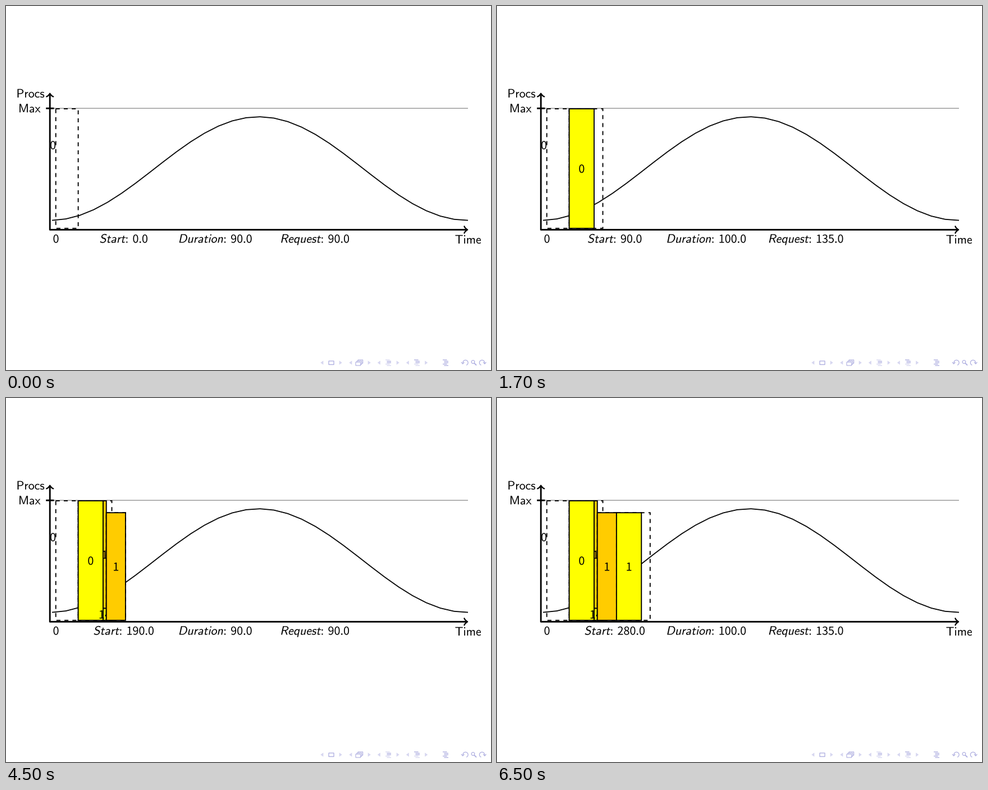
These frames come from a looping animation (864 by 648 pixels, 8 s). A matplotlib script:

```python
import numpy as np
import matplotlib.pyplot as plt
from matplotlib.animation import FuncAnimation
from matplotlib.mathtext import MathTextParser
from matplotlib.patches import PathPatch, Polygon, Rectangle
from matplotlib.path import Path
from matplotlib.textpath import TextPath
from matplotlib.transforms import Affine2D

plt.rcParams["mathtext.fontset"] = "cm"

WIDTH, HEIGHT, DPI = 864, 648, 72   # at 72 dpi one point is one pixel
INTERVAL, FRAMES = 500, 16
STEP_STARTS = [1, 5, 9, 13]
SIZE, DIGIT_SIZE = 21.8, 19.8
THICK, HEAVY = 1.9, 2.85
YELLOW, ORANGE = "#ffff00", "#ffcc00"
PALE, MID = "#d6d6f0", "#adade0"
LEFT, FLOOR, RIGHT = 78.2, 398.3, 823
BASE, BASELINE = 395.8, 421.5
FULL, HIGH, LOW = 183, 204.2, 374.3   # tops of the bars

fig = plt.figure(figsize=(WIDTH / DPI, HEIGHT / DPI), dpi=DPI, facecolor="white")
ax = fig.add_axes([0, 0, 1, 1])
ax.set(xlim=(0, WIDTH), ylim=(HEIGHT, 0))
ax.axis("off")
parser = MathTextParser("path")


def at(time):
    return 88.7 + 0.4436 * time


def is_number(s):
    return s[0].isdigit()


def sans(s):
    return rf"$\mathsf{{{s}}}$"


def text_width(s):
    if is_number(s):
        return DIGIT_SIZE * sum(0.278 if c == "." else 0.555 for c in s)
    return parser.parse(sans(s), dpi=720).width * SIZE / 100


def put(artist, z):
    artist.set(zorder=z, snap=False)
    return ax.add_artist(artist)


def line(xs, ys, color="black", lw=THICK, z=2):
    ax.plot(xs, ys, color=color, lw=lw, zorder=z, snap=False,
            solid_capstyle="butt", solid_joinstyle="round")


def text(s, x, y, z=5, slant=0.0):
    """Draw s with its left end on the baseline point (x, y)."""
    if is_number(s):
        path = TextPath((0, 0), s, size=DIGIT_SIZE, prop={"family": "Noto Sans CJK JP"})
    else:
        path = TextPath((0, 0), sans(s), size=SIZE)
    place = Affine2D.from_values(1, 0, slant, -1, x, y)
    return put(PathPatch(path.transformed(place), fc="black", lw=0), z)


def centered(s, x, y, z=5):
    return text(s, x - text_width(s) / 2, y, z)


def caption(word, value, x):
    """Slanted word, colon and value, centred on x."""
    word_w, gap = text_width(word), 0.611 * SIZE
    x -= (word_w + gap + text_width(value)) / 2
    colon_x = x + word_w + 0.1 * SIZE
    dots = [put(Rectangle((colon_x, y), 2.1, 2.2, fc="black", lw=0), 5)
            for y in (BASELINE - 9.6, BASELINE - 2.2)]
    return [text(word, x, BASELINE, slant=0.2126),
            text(value, x + word_w + gap, BASELINE), *dots]


def captions(start, duration, request):
    return (caption("Start", start, 209.6) + caption("Duration", duration, 372.6)
            + caption("Request", request, 550))


def dashed(start, end, top, z):
    dash = 7.11 / THICK
    box = Rectangle((at(start), top), at(end) - at(start), BASE - top, fill=False,
                    ec="black", lw=THICK, ls=(0, (dash, dash)), capstyle="butt")
    return put(box, z)


def bar(start, end, top, bottom, color, label, z):
    x0, x1 = at(start), at(end)
    box = Rectangle((x0, top), x1 - x0, bottom - top, fc=color, ec="black",
                    lw=THICK, joinstyle="miter")
    return [put(box, z),
            centered(label, (x0 + x1) / 2, (top + bottom) / 2 + 7.5, z + 0.1)]


def arrow_tip(x, y, angle):
    points = 1.52 * np.array([(-3, 4), (-2.75, 2.5), (0, 0.25), (0.75, 0),
                              (0, -0.25), (-2.75, -2.5), (-3, -4)])
    path = Path(points, [Path.MOVETO] + [Path.CURVE4] * 6)
    place = Affine2D().rotate_deg(angle).translate(x, y)
    put(PathPatch(path.transformed(place), fill=False, lw=0.8 * HEAVY,
                  capstyle="round", joinstyle="round"), 3)


def draw_chart():
    line([LEFT, RIGHT], [182.1, 182.1], "#606060", 0.95, 1)
    xs = np.linspace(82, RIGHT, 31)
    line(xs, 289.4 + 92.2 * np.cos(np.pi * (xs - 79) / 371.5), lw=1.8)
    line([LEFT, LEFT, RIGHT - 2], [156.5, FLOOR, FLOOR], lw=HEAVY, z=3)
    line([71.2, 85.4], [182.2, 182.2], lw=HEAVY, z=3)
    arrow_tip(RIGHT - 2, FLOOR, 0)
    arrow_tip(LEFT, 156.8, -90)
    centered("Procs", 43.6, 163)
    centered("Max", 41.8, 189.5)
    centered("Time", 823.2, 423)
    centered("0", 89, BASELINE)
    centered("0", 83.6, 255)


def draw_navigation():
    y = 635
    for x, way in zip((563, 596, 614, 647, 664.5, 698, 715.5, 748.5), (-1, 1) * 4):
        put(Polygon([(x + 2.7 * way, y), (x - 2.3 * way, y - 3.6),
                     (x - 2.3 * way, y + 3.6)], fc=PALE, lw=0), 2)
    put(Rectangle((575, 632), 9, 6.4, fill=False, ec=MID, lw=1.3), 2)
    for k in range(3):
        put(Rectangle((627 - 2 * k, 630 + 2 * k), 8.6, 6, fc="white", ec=MID, lw=1.1), 2)
    for x, dark in ((681, (1, 2)), (732, (0, 1, 2)), (783, range(5))):
        for k, indent in enumerate((0, 2.4, 2.4, 0, 2.4)):
            left = x - 5 + indent
            line([left, left + 7.6], [630 + 2.5 * k] * 2,
                 MID if k in dark else PALE, 1.3)
    turn = np.radians(np.linspace(-190, 70, 40))
    for x, way in ((818.5, -1), (848, 1)):
        line(x - way * 4.6 * np.cos(turn) * -1, y + 4.6 * np.sin(turn), MID, 1.2) \
            if way == 0 else line(x + way * 4.6 * -np.cos(turn),
                                  y + 4.6 * np.sin(turn), MID, 1.2)
        head = x + way * 4.8
        line([head - 2.6, head, head + 2.6], [634, 637.2, 634], MID, 1.2)
    ring = np.linspace(0, 2 * np.pi, 40)
    line(832 + 2.8 * np.cos(ring), 633.6 + 2.8 * np.sin(ring), MID, 1.2)
    line([834.2, 838], [635.8, 639.6], MID, 1.8)


draw_chart()
draw_navigation()

# Bars accumulate from step to step; captions belong to one step only.
bars = [
    [dashed(0, 90, FULL, 4)],
    [dashed(90, 225, FULL, 4.1), *bar(90, 190, FULL, BASE, YELLOW, "0", 4.2)],
    [dashed(190, 233, LOW, 4.35), *bar(190, 203, LOW, BASE, YELLOW, "14", 4.4)],
    [*bar(190, 203, FULL, LOW, ORANGE, "1", 4.55),
     dashed(203, 280, HIGH, 4.7), *bar(203, 280, HIGH, BASE, ORANGE, "1", 4.75)],
    [dashed(280, 415, HIGH, 4.86), *bar(280, 380, HIGH, BASE, YELLOW, "1", 4.88)],
]
notes = [captions(*values) for values in (
    ("0.0", "90.0", "90.0"), ("90.0", "100.0", "135.0"), ("190.0", "13.0", "43.0"),
    ("190.0", "90.0", "90.0"), ("280.0", "100.0", "135.0"))]


def update(frame):
    step = np.searchsorted(STEP_STARTS, frame, side="right")
    for k, (group, note) in enumerate(zip(bars, notes)):
        for artist in group:
            artist.set_visible(k <= step)
        for artist in note:
            artist.set_visible(k == step)
    return []


anim = FuncAnimation(fig, update, frames=FRAMES, init_func=lambda: update(0),
                     interval=INTERVAL, repeat=True, repeat_delay=0)
plt.show()
```
